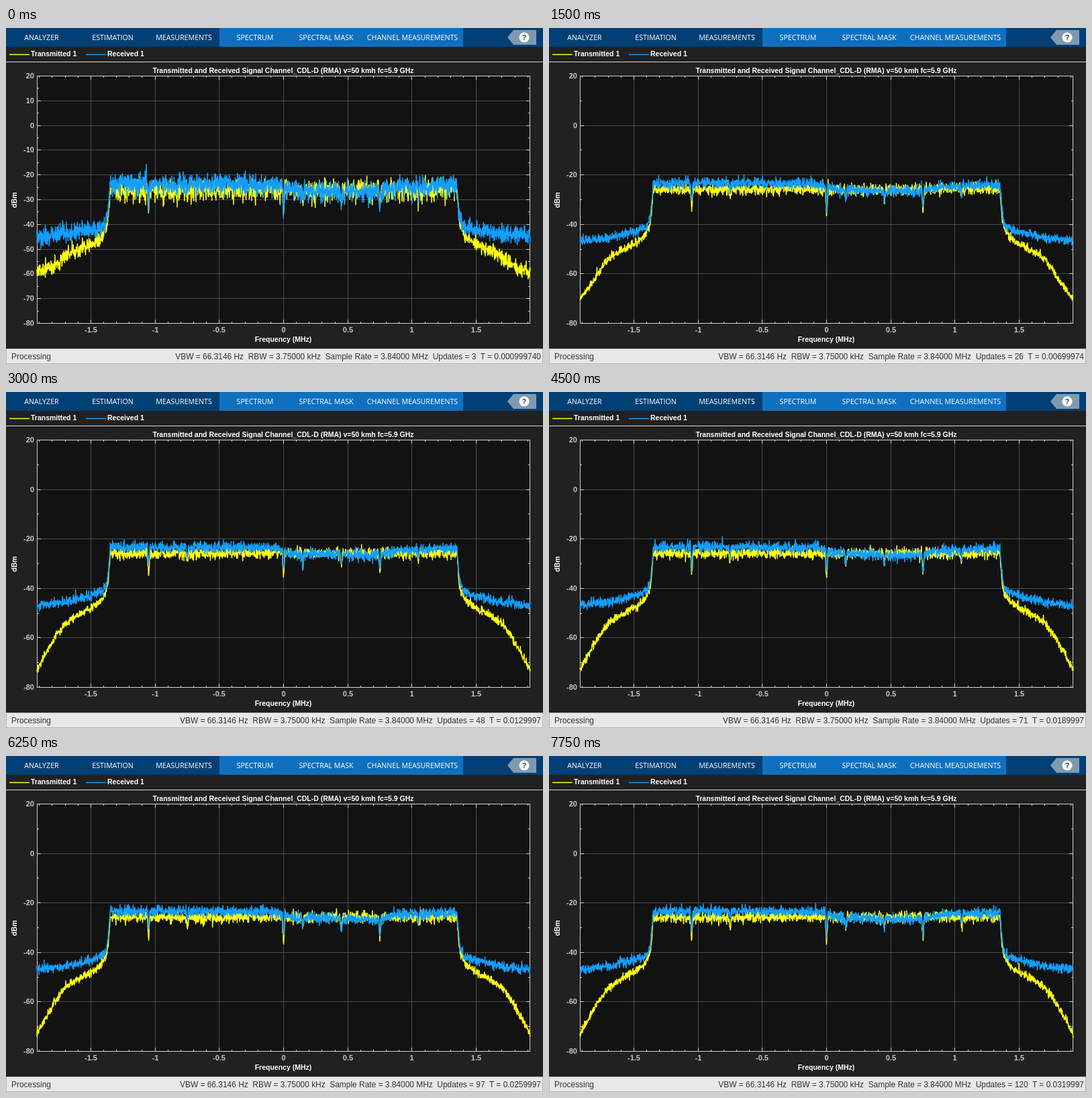
Animation, 800 px wide and 500 px high, one loop 8000 ms. Source, as an HTML page:

```html
<!DOCTYPE html>
<html lang="en">
<head>
<meta charset="utf-8">
<title>Spectrum analyzer</title>
<style>
html, body { margin: 0; width: 100%; height: 100%; overflow: hidden; background: #212121; }
svg { display: block; width: 800px; height: 500px; }
text { font: bold 10.5px "Liberation Sans", Arial, sans-serif; fill: #fff; }
.tab { font: 10.67px "Open Sans", "Noto Sans", sans-serif; }
.tick { font-size: 11px; fill: #c8c8c8; }
.status { font: 11.93px "Liberation Sans", Arial, sans-serif; fill: #333; }
.help { fill: #223a52; }
.mid { text-anchor: middle; }
.end { text-anchor: end; }
.grid { stroke: #4b4b4b; }
.axis { stroke: #d2d2d2; fill: none; }
.trace { fill: none; stroke-width: 1.5; stroke-linejoin: round; }
.yellow { stroke: #ffff11; }
.blue { stroke: #139fff; }
</style>
</head>
<body>
<svg id="stage" viewBox="0 0 800 500">
  <rect width="800" height="500" fill="#212121"/>
  <rect width="800" height="28" fill="#004076"/>
  <rect x="318" width="363" height="28" fill="#1070c0"/>
  <path d="M747 14L756 3H790V25H756Z" fill="#7f9ab0"/>
  <circle cx="772" cy="14" r="7.5" fill="#fff"/>
  <text class="mid help" x="772" y="18">?</text>
  <path d="M0 50.5H800" stroke="#d8d8d8"/>
  <path class="trace yellow" d="M5 39.5H35"/>
  <path class="trace blue" d="M119 39.5H149"/>
  <text x="37" y="42">Transmitted 1</text>
  <text x="151" y="42">Received 1</text>
  <text class="mid" x="413" y="67">Transmitted and Received Signal Channel_CDL-D (RMA) v=50 kmh fc=5.9 GHz</text>
  <rect x="46" y="71" width="735" height="369" fill="#121212"/>
  <g id="axes"></g>
  <path id="sent" class="trace yellow"/>
  <path id="received" class="trace blue"/>
  <text class="mid" x="413" y="467">Frequency (MHz)</text>
  <text class="mid" transform="translate(16 256) rotate(-90)">dBm</text>
  <rect x="0.5" y="477.5" width="799" height="22" fill="#e8e8e8" stroke="#b4b4b4"/>
  <text class="status" x="8" y="493">Processing</text>
  <text class="status end" id="status" x="797" y="493"></text>
</svg>
<script>
const STEP = 250, STEPS = 32, BINS = 2048, FORGET = 0.83;
const $ = id => document.getElementById(id);
const xOf = mhz => 413.5 + mhz * 191.4;
const yOf = dbm => 145.1 - dbm * 3.68;
const power = db => 10 ** (db / 10);

function add(parent, tag, attrs, text = '') {
  const node = document.createElementNS('http://www.w3.org/2000/svg', tag);
  for (const key in attrs) node.setAttribute(key, attrs[key]);
  node.textContent = text;
  return parent.appendChild(node);
}

// Toolbar tabs, centred on their labels
[['ANALYZER', 53], ['ESTIMATION', 159], ['MEASUREMENTS', 265], ['SPECTRUM', 371],
 ['SPECTRAL MASK', 477], ['CHANNEL MEASUREMENTS', 605.5]]
  .forEach(([label, x]) => add($('stage'), 'text', { class: 'tab mid', x, y: 18 }, label));

// Axes: major and minor ticks on opposite sides
const tickLength = major => major ? 6 : 3;

function yAxis(step) {
  const group = add($('axes'), 'g', {});
  let grid = '', ticks = '';
  for (let v = -80; v <= 20; v += step / 2) {
    const y = Math.floor(yOf(v)) + 0.5, major = v % step === 0, len = tickLength(major);
    ticks += `M46 ${y}h${len}M781 ${y}h${-len}`;
    if (!major) continue;
    grid += `M46 ${y}H781`;
    add(group, 'text', { class: 'tick end', x: 42, y: y + 3.5 }, v);
  }
  add(group, 'path', { class: 'grid', d: grid });
  add(group, 'path', { class: 'axis', d: ticks });
  return group;
}

function xAxis() {
  let grid = '', ticks = '';
  for (let i = -19; i <= 19; i++) {
    const x = Math.floor(xOf(i / 10)) + 0.5, major = i % 5 === 0, len = tickLength(major);
    ticks += `M${x} 71v${len}M${x} 440v${-len}`;
    if (!major) continue;
    grid += `M${x} 71V440`;
    add($('axes'), 'text', { class: 'tick mid', x, y: 453 }, i / 10);
  }
  add($('axes'), 'path', { class: 'grid', d: grid });
  add($('axes'), 'path', { class: 'axis', d: ticks + 'M46.5 71.5H780.5V439.5H46.5Z' });
}

const fineAxis = yAxis(10), coarseAxis = yAxis(20);
xAxis();

function interpolate(points, x) {
  const i = Math.max(1, points.findIndex(p => p[0] >= x));
  const [x0, y0] = points[i - 1], [x1, y1] = points[i];
  return y0 + (y1 - y0) * (x - x0) / (x1 - x0);
}

// Mean levels in dBm: band over frequency, skirt over |frequency|
const EDGE = 1.35, BAND_JITTER = 0.85;
const sent = {
  band: [[-1.35, -25.7], [1.35, -25.5]],
  skirt: [[1.35, -26], [1.365, -37], [1.38, -41], [1.42, -45], [1.5, -48], [1.6, -50.5],
          [1.7, -54], [1.78, -60], [1.86, -67], [1.93, -74]],
  startFloor: -57.5, jitter: 0.65, notch: 1
};
const received = {
  band: [[-1.35, -23.3], [-0.9, -23], [-0.1, -23.4], [0, -24.3], [0.05, -25.6],
         [0.7, -26.5], [0.9, -24.5], [1.35, -23.6]],
  skirt: [[1.35, -24], [1.36, -31], [1.375, -38], [1.4, -41], [1.5, -43], [1.7, -45.5], [1.93, -46.7]],
  startFloor: -47, jitter: 0.75, notch: 0.85
};
const notches = [[-1.05, 9], [-0.75, 4], [0, 11], [0.15, 5], [0.45, 5], [0.75, 9], [1.05, 4]];

function level(signal, f) {
  if (Math.abs(f) > EDGE) return interpolate(signal.skirt, Math.abs(f));
  let db = interpolate(signal.band, f);
  for (const [at, depth] of notches)
    db -= signal.notch * depth * Math.max(0, 1 - Math.abs(f - at) / 0.01);
  return db;
}

function randomFrom(seed) {
  return () => {
    seed = seed + 0x6D2B79F5 | 0;
    let t = Math.imul(seed ^ seed >>> 15, 1 | seed);
    t = t + Math.imul(t ^ t >>> 7, 61 | t) ^ t;
    return ((t ^ t >>> 14) >>> 0) / 4294967296;
  };
}

const updatesAt = step => Math.floor(3.75 * (step + 1));

// Exponentially averaged noisy spectra, one path per step
function record(signal, seed) {
  const random = randomFrom(seed);
  const bins = Array.from({ length: BINS }, (_, i) => {
    const f = -1.92 + 3.84 * i / (BINS - 1), inBand = Math.abs(f) <= EDGE;
    return { x: xOf(f).toFixed(1), mean: power(level(signal, f)), sum: 0,
             jitter: inBand ? BAND_JITTER : signal.jitter,
             extra: inBand ? 0 : power(signal.startFloor) };
  });
  const paths = [];
  let updates = 0, weight = 0;
  for (let step = 0; step < STEPS; step++) {
    for (; updates < updatesAt(step); updates++) {
      const settling = 0.8 ** updates;
      weight = weight * FORGET + 1;
      for (const bin of bins) {
        const noise = 1 - bin.jitter * (1 + Math.log(1 - random()));
        bin.sum = bin.sum * FORGET + (bin.mean + bin.extra * settling) * noise;
      }
    }
    paths.push('M' + bins.map(b =>
      b.x + ' ' + yOf(10 * Math.log10(b.sum / weight)).toFixed(1)).join('L'));
  }
  return paths;
}

const sentPaths = record(sent, 11), receivedPaths = record(received, 29);
const start = performance.now();
let shown = -1;

function draw() {
  const step = Math.floor((performance.now() - start) / STEP) % STEPS;
  if (step !== shown) {
    shown = step;
    $('sent').setAttribute('d', sentPaths[step]);
    $('received').setAttribute('d', receivedPaths[step]);
    fineAxis.style.display = step === 0 ? '' : 'none';
    coarseAxis.style.display = step === 0 ? 'none' : '';
    const time = ((step + 1) * 1e-3 - 2.6e-7).toPrecision(6);
    $('status').textContent = ['VBW = 66.3146 Hz', 'RBW = 3.75000 kHz', 'Sample Rate = 3.84000 MHz',
      `Updates = ${updatesAt(step)}`, `T = ${time}`].join('\u00a0 ');
  }
  requestAnimationFrame(draw);
}
draw();
</script>
</body>
</html>
```
